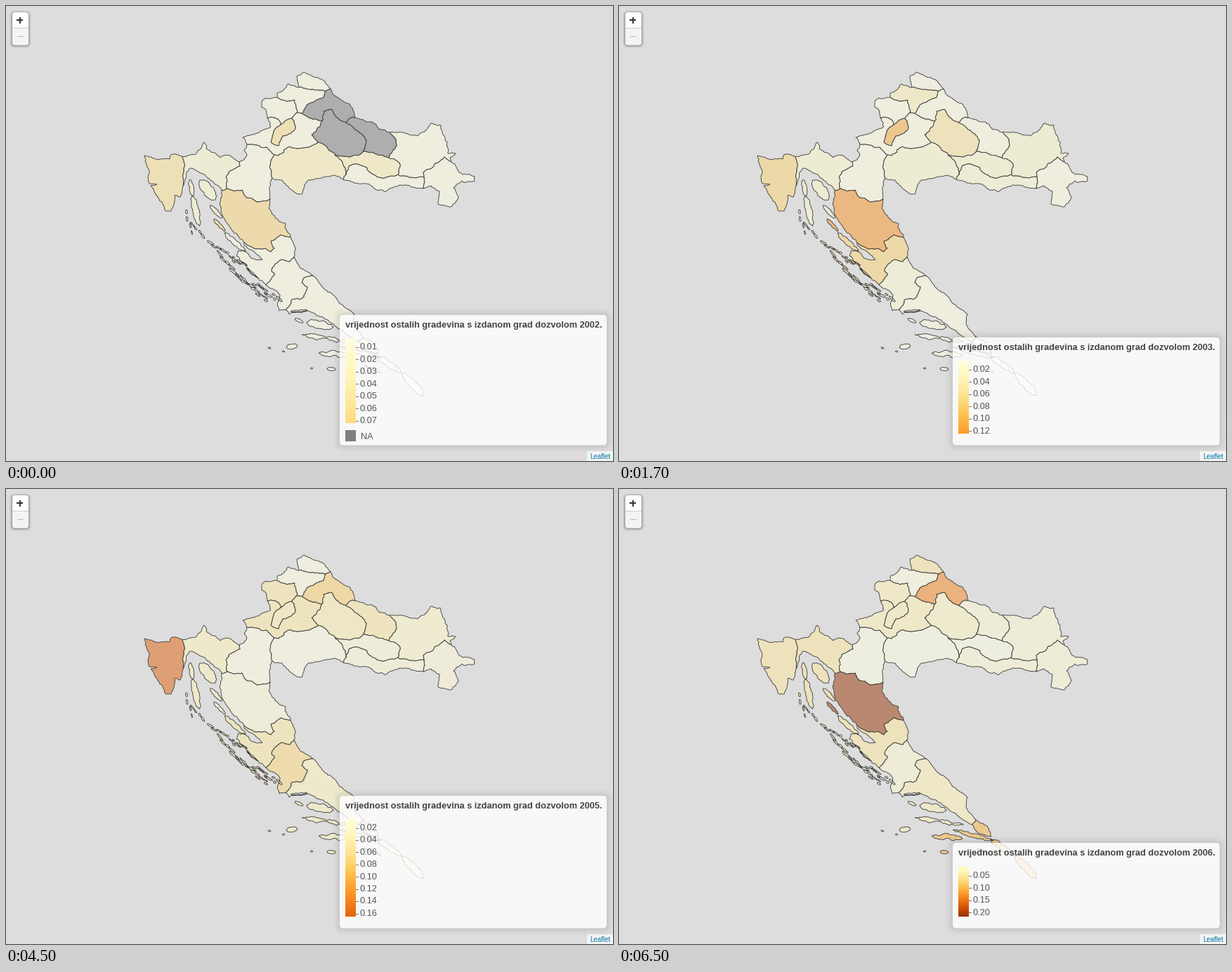
Write a matplotlib script that moves like this. It is 864 px wide and 648 px high and loops after 8 s.

```python
import numpy as np
import matplotlib.pyplot as plt
from matplotlib.animation import FuncAnimation
from matplotlib.patches import FancyBboxPatch, PathPatch, Rectangle
from matplotlib.path import Path

W, H = 864, 648
plt.rcParams["font.family"] = ["Liberation Sans", "DejaVu Sans"]
rng = np.random.default_rng(7)
cmap = plt.get_cmap("YlOrBr")
SCALE_MAX = 0.25

fig = plt.figure(figsize=(W / 72, H / 72), dpi=72, facecolor="#dddddd")
ax = fig.add_axes([0, 0, 1, 1])
ax.set_xlim(0, W)
ax.set_ylim(H, 0)
ax.axis("off")

borders = []   # (region codes on either side, fractal line)
islands = {}   # region code -> list of rings


def fractal(a, b):
    """Points from a up to b, with every midpoint pushed sideways."""
    step = b - a
    length = np.hypot(*step)
    if length < 3.6:
        return [a]
    push = rng.normal(0, 0.3 + 0.045 * length) / length
    middle = (a + b) / 2 + push * np.array([-step[1], step[0]])
    return fractal(a, middle) + fractal(middle, b)


def rough(points):
    pts = np.array(points, float)
    line = [p for a, b in zip(pts, pts[1:]) for p in fractal(a, b)]
    return np.array(line + [pts[-1]])


def border(sides, *points):
    borders.append((sides.split(), rough(points)))


def isle(region, x, y, length, width, degrees):
    """Rough oval island, tilted clockwise."""
    t = np.linspace(0, 2 * np.pi, 11)
    oval = (length * np.cos(t) + 1j * width * np.sin(t)) / 2
    oval *= np.exp(1j * np.radians(degrees))
    ring = rough(np.column_stack([x + oval.real, y + oval.imag]))
    islands.setdefault(region, []).append(ring)


def archipelago(region, start, end, spread, count, longest):
    """Slivers scattered along a line, lying parallel to it."""
    along = np.subtract(end, start)
    direction = along / np.hypot(*along)
    tilt = np.degrees(np.arctan2(*direction[::-1]))
    for k in range(count):
        x, y = (start + along * (k + .5) / count
                + rng.uniform(-spread, spread) * np.array([-direction[1], direction[0]]))
        isle(region, x, y, rng.uniform(4, longest), rng.uniform(1.5, 3.2), tilt + rng.normal(0, 6))


def rings(region):
    """Chain the borders of a region into closed outlines."""
    left = [line for sides, line in borders if region in sides]
    ring = left.pop(0)
    while left:
        i = next(i for i, line in enumerate(left)
                 if any(np.allclose(line[e], ring[-1]) for e in (0, -1)))
        line = left.pop(i)
        ring = np.vstack([ring, line if np.allclose(line[0], ring[-1]) else line[::-1]])
    return [ring] + islands.get(region, [])


# North
border("MED", (417, 116), (414, 100), (424, 94), (447, 104), (462, 118))
border("MED VAR", (417, 116), (440, 120), (455, 121))
border("MED KOP", (455, 121), (462, 118))
border("VAR", (417, 116), (402, 111), (396, 119), (386, 124), (386, 130))
border("VAR KRA", (386, 130), (400, 136), (411, 134), (414, 152))
border("VAR ZAG", (414, 152), (421, 153))
border("VAR KOP", (421, 153), (428, 141), (452, 130), (455, 121))
border("KOP", (462, 118), (466, 126), (488, 139), (497, 159))
border("KOP VIR", (497, 159), (489, 160), (484, 166))
border("KOP BJE", (484, 166), (476, 163), (463, 147), (452, 150), (449, 164))
border("KOP ZAG", (449, 164), (433, 160), (421, 153))
border("KRA", (386, 130), (370, 131), (364, 137), (364, 144), (370, 148), (372, 159))
border("KRA ZAG", (372, 159), (387, 161), (391, 169))
border("KRA CIT", (391, 169), (407, 160))
border("KRA ZAG", (407, 160), (414, 152))
border("CIT ZAG", (391, 169), (381, 178), (377, 194), (388, 199), (394, 185),
       (406, 181), (412, 173), (407, 160))
border("ZAG", (372, 159), (376, 173), (350, 183), (337, 187), (343, 197))
border("ZAG KAR", (343, 197), (357, 198), (370, 201), (382, 212))
border("ZAG SIS", (382, 212), (388, 213), (402, 201), (430, 201), (444, 194))
border("ZAG BJE", (449, 164), (441, 179), (435, 183), (444, 194))

# East
border("BJE SIS", (444, 194), (456, 200), (468, 211))
border("BJE POZ", (468, 211), (503, 212), (509, 207))
border("BJE VIR", (484, 166), (497, 176), (513, 191), (509, 207))
border("VIR POZ", (509, 207), (528, 211), (545, 216))
border("VIR OSI", (545, 216), (556, 199), (555, 190), (546, 180))
border("VIR", (497, 159), (520, 165), (532, 176), (546, 180))
border("OSI", (546, 180), (585, 185), (596, 179), (605, 167), (619, 170), (628, 194),
       (629, 210), (640, 210), (632, 216), (634, 222))
border("OSI VUK", (634, 222), (624, 215), (611, 224), (606, 231), (594, 237), (595, 243))
border("OSI BRO", (595, 243), (575, 244), (558, 240))
border("OSI POZ", (545, 216), (561, 226), (558, 240))
border("VUK", (634, 222), (645, 237), (667, 243), (667, 249), (649, 249), (637, 259),
       (644, 273), (634, 286), (615, 282), (617, 264), (605, 256), (594, 260))
border("VUK BRO", (594, 260), (596, 251), (595, 243))
border("BRO", (594, 260), (575, 256), (560, 255), (541, 264), (512, 253), (480, 247))
border("BRO SIS", (480, 247), (484, 240))
border("BRO POZ", (484, 240), (489, 227), (506, 227), (518, 237), (535, 245), (558, 240))
border("POZ SIS", (468, 211), (479, 223), (484, 240))

# Centre
border("SIS", (480, 247), (468, 241), (440, 246), (427, 252), (421, 268), (405, 261),
       (393, 248), (379, 245))
border("SIS KAR", (382, 212), (378, 236), (379, 245))
border("KAR", (379, 245), (376, 252), (376, 275))
border("KAR LIK", (376, 275), (357, 279), (336, 262), (315, 260))
border("KAR PRI", (315, 260), (313, 244), (317, 236), (333, 228), (332, 222))
border("KAR", (332, 222), (343, 212), (339, 206), (343, 197))

# West coast
border("PRI", (251, 215), (270, 211), (282, 194), (285, 203), (305, 216), (313, 212), (332, 222))
border("PRI", (307, 262), (283, 240), (264, 231), (257, 237), (252, 256))
border("PRI LIK", (315, 260), (307, 262))
border("PRI IST", (251, 215), (253, 232), (252, 256))
border("IST", (251, 215), (237, 211), (233, 218), (210, 217), (197, 213), (204, 234),
       (204, 253), (215, 254), (206, 256), (213, 268), (228, 292), (235, 292), (240, 270),
       (248, 272), (252, 256))
border("LIK", (307, 262), (307, 297), (319, 315), (339, 337))
border("LIK ZAD", (339, 337), (357, 346), (377, 350), (382, 345), (377, 335), (391, 326),
       (405, 329))
border("LIK", (376, 275), (374, 288), (391, 308), (398, 310), (397, 316), (405, 329))

# South
border("ZAD", (405, 329), (411, 349), (410, 357))
border("ZAD SIB", (410, 357), (404, 364), (392, 361), (378, 376), (382, 383), (370, 397))
border("ZAD", (339, 337), (343, 344), (365, 361), (355, 361), (338, 348), (330, 349),
       (328, 356), (348, 381), (370, 397))
border("SIB", (410, 357), (437, 384))
border("SIB SPL", (437, 384), (424, 387), (421, 394), (429, 400), (424, 414), (407, 418),
       (399, 433))
border("SIB", (370, 397), (384, 405), (390, 412), (389, 434), (399, 433))
border("SPL", (437, 384), (475, 424), (496, 439), (494, 451), (508, 471))
border("SPL", (399, 433), (403, 439), (430, 434), (464, 452), (480, 462), (503, 478))
border("SPL DUB", (508, 471), (503, 478))
border("DUB", (508, 471), (524, 480), (530, 495), (510, 489), (503, 478))

# Islands
isle("PRI", 264, 259, 24, 7, 80)
isle("PRI", 270, 292, 44, 10, 76)
isle("PRI", 287, 262, 36, 16, 52)
isle("PRI", 299, 293, 25, 6, 47)
isle("LIK", 304, 312, 24, 5, 47)
isle("ZAD", 326, 336, 40, 7, 42)
isle("SPL", 447, 454, 39, 12, 10)
isle("SPL", 456, 473, 70, 6, 8)
isle("SPL", 407, 485, 16, 7, -8)
isle("SPL", 417, 448, 13, 4, 25)
isle("SPL", 417, 434, 24, 3, -5)
isle("SPL", 375, 487, 4, 2, 20)
isle("SPL", 395, 492, 3, 2, 0)
isle("DUB", 467, 496, 44, 8, 4)
isle("DUB", 463, 517, 12, 5, 4)
isle("DUB", 435, 516, 3, 2, 0)
isle("DUB", 504, 493, 60, 6, 15)
isle("DUB", 522, 517, 26, 3, 22)
isle("DUB", 546, 511, 42, 8, 34)
isle("DUB", 579, 539, 44, 11, 46)
archipelago("PRI", (256, 288), (264, 328), 2, 4, 8)
archipelago("PRI", (264, 308), (283, 330), 2, 4, 12)
archipelago("ZAD", (289, 334), (334, 368), 3, 8, 13)
archipelago("ZAD", (322, 354), (352, 386), 4, 5, 22)
archipelago("ZAD", (300, 352), (340, 394), 3, 7, 20)
archipelago("SIB", (334, 390), (374, 420), 3, 7, 16)
archipelago("SIB", (352, 394), (390, 420), 4, 9, 13)

# Values by year, counties sharing a level grouped; the rest stay at the base.
BASE, NA = .005, None
values = [
    {.063: "IST CIT", .073: "LIK", .036: "SIS POZ", .018: "PRI", NA: "KOP BJE VIR"},
    {.128: "LIK", .106: "CIT", .077: "IST ZAD", .056: "BJE", .038: "VAR",
     .021: "PRI OSI SIS POZ", .016: "BRO SIB"},
    {.189: "DUB", .14: "ZAD", .082: "CIT", .072: "SIB", .06: "PRI", .045: "LIK",
     .035: "IST", .025: "SIS POZ VAR MED", .014: "SPL BRO"},
    {.168: "IST", .078: "KOP", .072: "SIB", .05: "VIR KRA ZAG ZAD", .04: "CIT BJE",
     .035: "PRI SPL DUB", .023: "OSI", .012: "LIK BRO VUK POZ", .002: "SIS KAR"},
    {.218: "LIK", .138: "KOP", .105: "DUB", .055: "IST PRI ZAD MED", .038: "KRA ZAG CIT SPL",
     .03: "BJE", .015: "OSI VIR BRO VUK SIB", .001: "KAR SIS POZ"},
]

# Box top, first tick y, tick step, tick count
legends = [(440, 485, .01, 7), (472, 517, .02, 6), (413, 459, .02, 9),
           (437, 481.5, .02, 8), (504, 550, .05, 4)]
TICK_GAP = 17.45


def rounded(x0, y0, x1, y1, radius, **style):
    box = FancyBboxPatch((x0, y0), x1 - x0, y1 - y0,
                         boxstyle=f"round,pad=0,rounding_size={radius}", **style)
    return ax.add_patch(box)


def shadow(x0, y0, x1, y1, radius, blur, alpha, zorder):
    """Soft glow made of one pixel rings, leaving the inside clear."""
    return [rounded(x0 - k, y0 - k, x1 + k, y1 + k, radius + k, fc="none", lw=1,
                    ec=(0, 0, 0, alpha * (1 - k / blur) ** 2), zorder=zorder)
            for k in np.arange(0.5, blur)]


def block(x0, y0, x1, y1, color, zorder=3, **style):
    return ax.add_patch(Rectangle((x0, y0), x1 - x0, y1 - y0, fc=color, ec="none",
                                  zorder=zorder, **style))


def label(x, y, text, size=12.75, color="#555555", **style):
    return ax.text(x, y, text, size=size, color=color, va="baseline", zorder=6, **style)


counties = {}
for code in sorted({code for sides, _ in borders for code in sides}):
    shape = Path.make_compound_path(*(Path(r, closed=True) for r in rings(code)))
    counties[code] = ax.add_patch(PathPatch(shape, ec="#444444", lw=0.9, zorder=1))

# Zoom buttons
shadow(9, 10, 32, 56, 4, 5, .34, 2)
rounded(9, 9, 32, 55, 4, fc="white", ec="none", zorder=3)
rounded(9, 32, 32, 55, 4, fc="#f4f4f4", ec="none", zorder=3)
block(9, 32, 32, 37, "#f4f4f4")
block(9, 31, 32, 32, "#cccccc")
block(15, 19, 24, 21, "#333333")
block(18.5, 15.5, 20.5, 24.5, "#333333")
block(16, 43, 25, 44, "#bbbbbb")

# Attribution
block(827, 634, W, H, "white", alpha=.7)
label(831, 644.6, "Leaflet", 9.7, "#0078a8")

legend_parts = []


def draw_legend(year):
    while legend_parts:
        legend_parts.pop().remove()
    top, first, step, count = legends[year]
    has_na = NA in values[year]
    bar_top, bar_bottom = top + 33, 594 if has_na else 609
    add = legend_parts.append
    legend_parts.extend(shadow(475, top, 855, 625.5, 5, 13, .1, 4))
    add(rounded(475, top, 855, 625.5, 5, fc=(1, 1, 1, .8), ec="none", zorder=5))
    add(label(483, top + 17.6, f"vrijednost ostalih gradevina s izdanom grad dozvolom {2002 + year}.",
              color="#444444", weight="bold"))
    ends = [step * (1 + (y - first) / TICK_GAP) for y in (bar_top, bar_bottom)]
    add(ax.imshow(np.linspace(*ends, 200)[:, None], cmap=cmap, vmin=0, vmax=SCALE_MAX,
                  extent=(483, 498, bar_bottom, bar_top), aspect="auto", zorder=6))
    for i in range(count):
        y = first + i * TICK_GAP
        add(block(498, y + 1, 502, y + 2, "#777777", 6))
        add(label(503.3, y + 4.3, f"{step * (i + 1):.2f}"))
    if has_na:
        add(block(483, 604, 498, 620, "#808080", 6))
        add(label(505, 616.8, "NA"))


def update(frame):
    year = (frame + 3) // 4
    level = {code: v for v, codes in values[year].items() for code in codes.split()}
    for code, patch in counties.items():
        value = level.get(code, BASE)
        color = (.5, .5, .5) if value is NA else cmap(value / SCALE_MAX)[:3]
        patch.set_facecolor((*color, .5))
    draw_legend(year)
    return []


anim = FuncAnimation(fig, update, frames=16, interval=500, repeat=True, repeat_delay=0)
plt.show()
```
